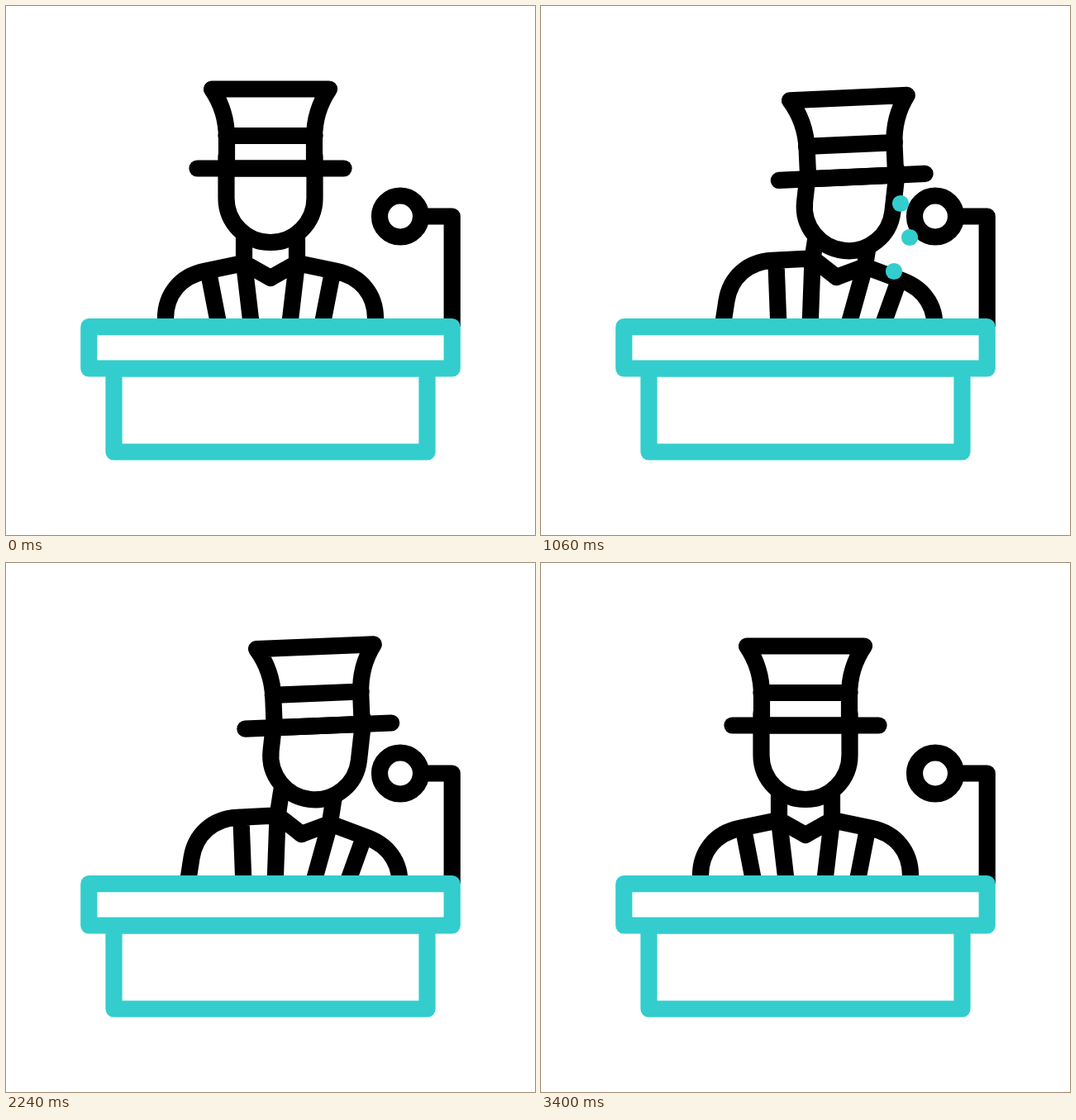
An HTML page with a canvas for the animation above (3.6 s loop, 640x640 px).

```html
<!DOCTYPE html>
<html lang="en">
<head>
<meta charset="utf-8">
<title>Speaker</title>
<style>
  html, body { margin: 0; width: 100%; height: 100%; overflow: hidden; background: #fff; }
  canvas { display: block; width: 100vmin; height: 100vmin; }
</style>
</head>
<body>
<canvas id="stage" width="640" height="640"></canvas>
<script>
const ctx = document.getElementById('stage').getContext('2d');
const LOOP = 3600, STROKE = 20.2;
const BLACK = '#000', TEAL = '#33cdcd', WHITE = '#fff';
const RAD = Math.PI / 180;
const CENTER = 320, BRIM = 196.5, CROWN_TOP = 100.5, HEAD_R = 53.5;

// Eased progress from 0 to 1 between two times.
function ramp(t, from, to) {
  const x = Math.min(1, Math.max(0, (t - from) / (to - from)));
  return x * x * (3 - 2 * x);
}

const leanAt = t => 8.8 * (ramp(t, 0, 640) - ramp(t, 2595, 3400));
const bobAt = t => 10 * (ramp(t, 0, 1000) - ramp(t, 1040, 1740));
const hatTiltAt = t => -16.5 * ramp(t, 0, 600) + 32.8 * ramp(t, 880, 1605)
  - 29.3 * ramp(t, 1700, 2340) + 13 * ramp(t, 2340, 2800);

function rotateAround(x, y, degrees) {
  ctx.translate(x, y);
  ctx.rotate(degrees * RAD);
  ctx.translate(-x, -y);
}

function draw(path, color, filled) {
  if (filled) {
    ctx.fillStyle = WHITE;
    ctx.fill(path);
  }
  ctx.strokeStyle = color;
  ctx.stroke(path);
}

function line(x1, y1, x2, y2, color) {
  ctx.strokeStyle = color;
  ctx.beginPath();
  ctx.moveTo(x1, y1);
  ctx.lineTo(x2, y2);
  ctx.stroke();
}

function box(left, top, right, bottom) {
  const path = new Path2D();
  path.rect(left, top, right - left, bottom - top);
  return path;
}

const halfBody = new Path2D('M193 440V378C193 349 211 327 240 321L288 311' +
  'M245 322L266 430M288 280V311L302 430M288 311L320 329');

const face = new Path2D();
face.moveTo(CENTER + HEAD_R, BRIM - 14);
face.arc(CENTER, BRIM + 36, HEAD_R, 0, Math.PI);
face.lineTo(CENTER - HEAD_R, BRIM - 14);

const crown = new Path2D('M267 196.5V160C267 140 261 118 249 100.5H391C379 118 373 140 373 160V196.5Z');

const micHead = new Path2D();
micHead.arc(477, 254.5, 25, 0, 2 * Math.PI);
const micArm = new Path2D('M502 254.5H539.7V388');
const deskTop = box(100.3, 388.2, 539.7, 438.5);
const deskBase = box(130.5, 438.5, 509.5, 539.5);

function drawBody() {
  draw(halfBody, BLACK);
  ctx.save();
  ctx.translate(2 * CENTER, 0);
  ctx.scale(-1, 1);
  draw(halfBody, BLACK);
  ctx.restore();
}

function drawSpeaker(t) {
  const tilt = hatTiltAt(t);
  ctx.save();
  rotateAround(345, 572, leanAt(t));
  drawBody();
  ctx.translate(0, bobAt(t));
  // The face follows a small share of the hat's swing.
  rotateAround(CENTER, BRIM, tilt * 0.22);
  draw(face, BLACK, true);
  rotateAround(CENTER, BRIM, tilt * 0.78);
  draw(crown, BLACK, true);
  line(CENTER - HEAD_R, 157, CENTER + HEAD_R, 157, BLACK);
  line(CENTER - 88.5, BRIM, CENTER + 88.5, BRIM, BLACK);
  ctx.restore();
}

// Three dashes fan out from a slanted row at the mouth towards the microphone.
function drawBurst(t, start, mouthX, slant) {
  const travel = 500, lag = 110;
  if (t < start || t > start + travel + lag + 10) return;
  const head = ramp(t, start, start + travel);
  const tail = ramp(t, start + lag, start + lag + travel);
  for (let i = -1; i <= 1; i++) {
    const x = mouthX - 33 * i * Math.sin(slant * RAD);
    const y = 270 + 33 * i * Math.cos(slant * RAD);
    const dx = 446 - 15 * i * i - 4 * i - x;
    const dy = 280 + 41 * i - y;
    line(x + dx * tail, y + dy * tail, x + dx * head + 0.01, y + dy * head, TEAL);
  }
}

function render(t) {
  ctx.fillStyle = WHITE;
  ctx.fillRect(0, 0, 640, 640);
  ctx.lineWidth = STROKE;
  ctx.lineCap = ctx.lineJoin = 'round';
  drawSpeaker(t);
  ctx.lineCap = 'butt';
  draw(micArm, BLACK);
  draw(micHead, BLACK, true);
  draw(deskBase, TEAL, true);
  draw(deskTop, TEAL, true);
  ctx.lineCap = 'round';
  drawBurst(t, 450, 415.5, 2);
  drawBurst(t, 1290, 406.5, 12);
}

const began = performance.now();
function tick() {
  render((performance.now() - began) % LOOP);
  requestAnimationFrame(tick);
}
tick();
</script>
</body>
</html>
```
